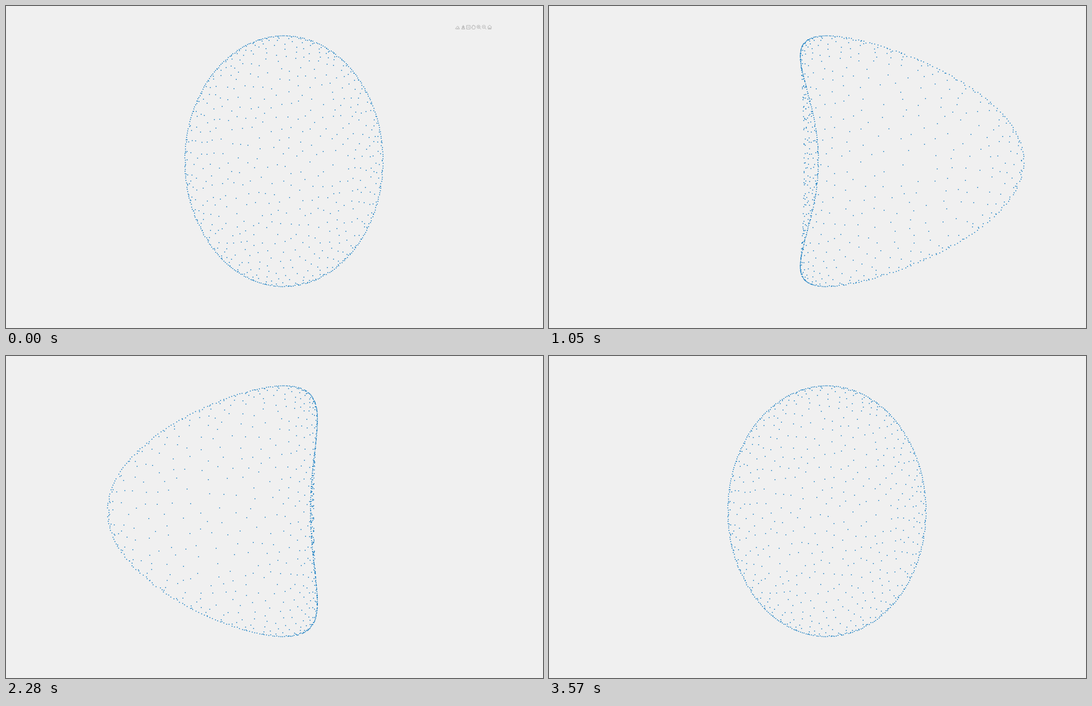
An HTML page with a canvas for the animation above (3600 ms loop, 966 by 580 pixels).

```html
<!DOCTYPE html>
<html lang="en">
<head>
<meta charset="utf-8">
<title>Vibrating point cloud</title>
<style>
  html, body { margin: 0; width: 966px; height: 580px; overflow: hidden; background: #f0f0f0; }
  canvas, svg { position: absolute; left: 0; top: 0; display: block; }
  svg { fill: none; stroke: #b2b2b2; stroke-width: .9; }
</style>
</head>
<body>
<canvas id="stage" width="966" height="580"></canvas>
<svg id="tools" width="966" height="580">
  <path d="M808.500 41l4-5 2 2-3 3.300zM811 41.300h5M814 38.500l2 2.500"/>
  <path d="M822.500 34.500v4M821 36.500h3v2.500h-3zM819.500 41.500l1.500-2.500h3l1.500 2.500z"/>
  <path d="M828.500 35h6.500v6.500h-6.500zM830 38.200h3.500"/>
  <path d="M839 41.500l-1.800-3.200 1.600.3v-3h1.200v-1h1.500v.7h1.300v1h1.200v3l-1 2.200z"/>
  <g id="lens">
    <circle cx="850" cy="37.500" r="2.900"/>
    <path d="M852.200 39.700l2.300 2.300M848.500 37.500h3"/>
  </g>
  <path d="M850 36v3"/>
  <use href="#lens" x="9.500"/>
  <path d="M866.300 38l3.700-3.500 3.700 3.500M867.300 37.500v4h5.400v-4M869 41.500v-2h2v2"/>
</svg>
<script>
const CX = 500, CY = 279.6, RX = 178.5, RY = 226;
const STEP = 30, FRAMES = 120, SWING = 176.5;
const ctx = document.getElementById('stage').getContext('2d');
const tools = document.getElementById('tools');

let seed = 20;
function rand() {
  seed = (seed + 0x6D2B79F5) | 0;
  let r = Math.imul(seed ^ (seed >>> 15), 1 | seed);
  r = (r + Math.imul(r ^ (r >>> 7), 61 | r)) ^ r;
  return ((r ^ (r >>> 14)) >>> 0) / 4294967296;
}

// Evenly spread points on a dome, each the farthest of several candidates
function dome(count, tries) {
  const pts = [];
  while (pts.length < count) {
    let best, far = -1;
    for (let i = 0; i < tries; i++) {
      const z = 0.09 + 0.91 * rand(), a = rand() * 2 * Math.PI, r = Math.sqrt(1 - z * z);
      const p = { u: r * Math.cos(a), v: r * Math.sin(a), z };
      let near = 9;
      for (const q of pts) {
        const d = (p.u - q.u) ** 2 + (p.v - q.v) ** 2 + (p.z - q.z) ** 2;
        if (d < near) near = d;
      }
      if (near > far) { far = near; best = p; }
    }
    pts.push(best);
  }
  return pts;
}

function rim(count) {
  return Array.from({ length: count }, (_, i) => {
    const a = (i + 0.35 * (rand() - 0.5)) / count * 2 * Math.PI;
    const r = 1 - 0.012 * rand() ** 4;
    return { u: r * Math.cos(a), v: r * Math.sin(a), z: 0 };
  });
}

const points = [...dome(545, 18), ...rim(345)];

function draw(frame) {
  const s = Math.sin(2 * Math.PI * frame / (FRAMES - 1));
  ctx.fillStyle = '#f0f0f0';
  ctx.fillRect(0, 0, 966, 580);
  ctx.fillStyle = '#0072bd';
  for (const { u, v, z } of points) {
    const bend = SWING * s * u * u * (1 + 0.2 * z * z);
    const stretch = 7 * s * s * u ** 3;
    const x = CX + RX * u + bend + stretch, y = CY + RY * v;
    ctx.fillRect(x - 0.75, y - 0.75, 1.5, 1.5);
  }
  tools.style.visibility = frame ? 'hidden' : 'visible';
}

let shown = -1;
const start = performance.now();
function tick() {
  const frame = Math.floor((performance.now() - start) / STEP) % FRAMES;
  if (frame !== shown) draw(shown = frame);
  requestAnimationFrame(tick);
}
tick();
</script>
</body>
</html>
```
